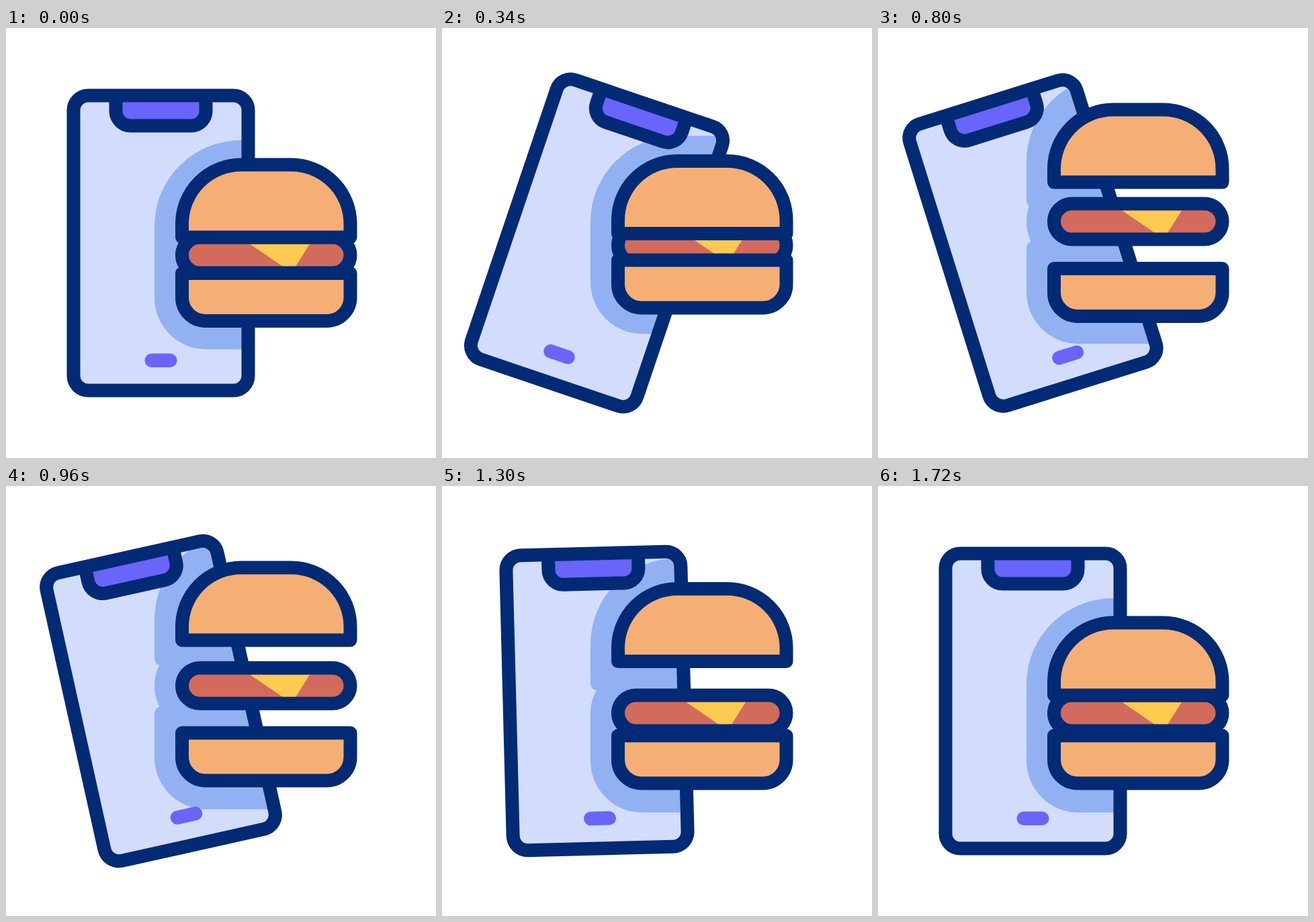
An HTML page for the animation above (2 s loop, 640 by 640 pixels).

```html
<!DOCTYPE html>
<html lang="en">
<head>
<meta charset="utf-8">
<title>Burger order</title>
<style>
  html, body { margin: 0; width: 100%; height: 100%; overflow: hidden; background: #fff; }
  svg { display: block; width: 100vw; height: 100vh; }
  .line { stroke: #032a74; stroke-width: 20; stroke-linejoin: round; }
  .bun { fill: #f5af75; }
  .accent { fill: #6965fa; }
</style>
</head>
<body>
<svg viewBox="0 0 640 640">
  <clipPath id="screen"><rect x="100.5" y="100.5" width="260" height="439" rx="22"/></clipPath>

  <g id="phone">
    <rect x="100.5" y="100.5" width="260" height="439" rx="22" fill="#d2dcfd"/>
    <g clip-path="url(#screen)">
      <g id="shadow" fill="#92b1f3">
        <path id="topShade" d="M221 295A129 128 0 0 1 350 167H425A129 128 0 0 1 554 295V352q0 12-12 12H233q-12 0-12-12Z"/>
        <rect id="meatShade" x="221" y="269" width="333" height="138" rx="69"/>
        <path id="baseShade" d="M221 345q0-12 12-12H542q12 0 12 12V409A77 77 0 0 1 477 486H298A77 77 0 0 1 221 409Z"/>
      </g>
    </g>
    <path class="line accent" d="M163.5 100.5V123.5a22 22 0 0 0 22 22H275.5a22 22 0 0 0 22-22V100.5"/>
    <rect class="line" x="100.5" y="100.5" width="260" height="439" rx="22" fill="none"/>
    <rect class="accent" x="206.5" y="484.5" width="48" height="20.5" rx="10.2"/>
  </g>

  <g id="meat">
    <rect x="262" y="311.5" width="250.5" height="53" rx="26.5" fill="#d36b5d"/>
    <path d="M363 321.5H452L431 355H412Z" fill="#feca4f"/>
    <rect class="line" x="262" y="311.5" width="250.5" height="53" rx="26.5" fill="none"/>
  </g>
  <path id="base" class="line bun" d="M262 371.5H512.5V407.5A35 35 0 0 1 477.5 442.5H297A35 35 0 0 1 262 407.5Z"/>
  <path id="top" class="line bun" d="M262 311.5V292A88 88 0 0 1 350 203.5H424.5A88 88 0 0 1 512.5 292V311.5Z"/>
</svg>
<script>
  const LOOP = 2000, STEP = 20;
  const smooth = u => (1 - Math.cos(Math.PI * u)) / 2;
  const gather = u => u ** 2.35;

  // Keys: [time in ms, value, easing towards this key]
  const tilt = [[0, 0], [407, 20], [512, 20], [857, -20], [1167, 10], [1410, -10], [1720, 0, gather]];
  const lifts = {
    base: [[-188, 0], [378, -26.3], [492, -26.3], [1120, 0]],
    meat: [[135, 0], [699, -50], [826, -50], [1300, 0]],
    top: [[246, 0], [810, -82], [1067, -82], [1614, 0]]
  };
  const shadeRate = { base: 1.18, meat: 1, top: 1.18 };

  function valueAt(keys, t) {
    if (t <= keys[0][0]) return keys[0][1];
    for (let i = 1; i < keys.length; i++) {
      const [t0, a] = keys[i - 1], [t1, b, ease = smooth] = keys[i];
      if (t < t1) return a + (b - a) * ease((t - t0) / (t1 - t0));
    }
    return keys[keys.length - 1][1];
  }

  const place = (id, transform) => document.getElementById(id).setAttribute("transform", transform);
  const turn = angle => `rotate(${angle} 230.5 320)`;

  function draw(now) {
    const t = Math.floor(now % LOOP / STEP) * STEP;
    const angle = valueAt(tilt, t);
    place("phone", turn(angle));
    place("shadow", turn(-angle));
    for (const part in lifts) {
      const y = valueAt(lifts[part], t);
      place(part, `translate(0 ${y})`);
      place(part + "Shade", `translate(0 ${y * shadeRate[part]})`);
    }
  }

  const start = performance.now();
  function tick() {
    draw(performance.now() - start);
    requestAnimationFrame(tick);
  }
  tick();
</script>
</body>
</html>
```
